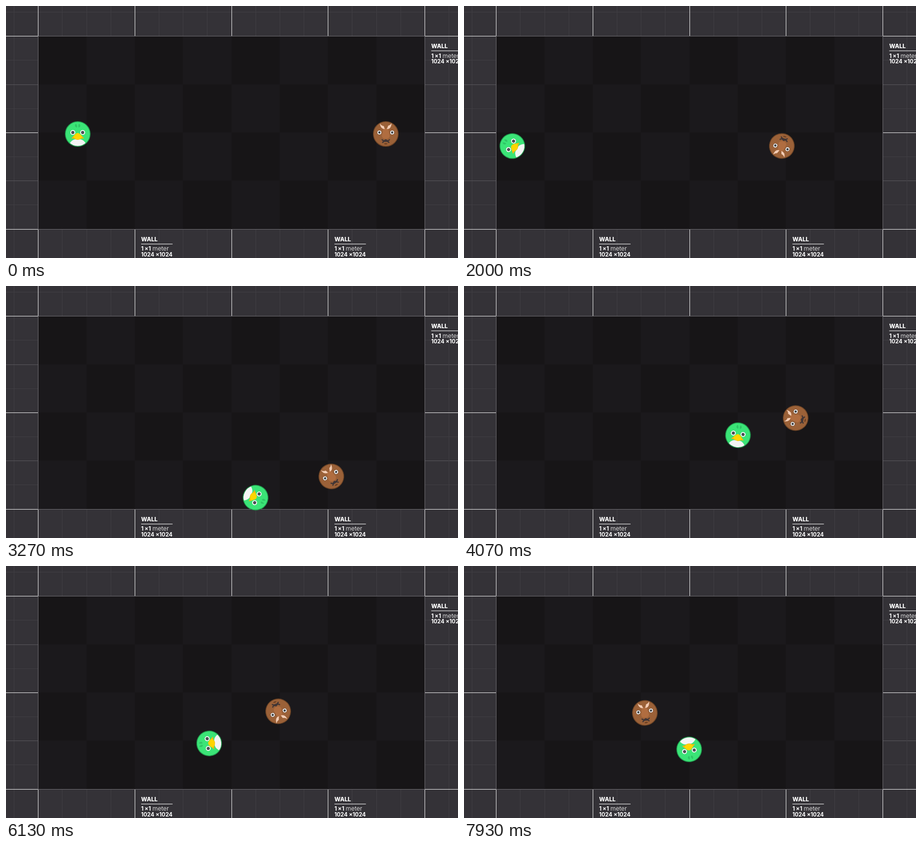
Write an HTML page with a canvas that moves like this. It is 920x514 px and loops after 8 s.

```html
<!DOCTYPE html>
<html lang="en">
<head>
<meta charset="utf-8">
<title>Bouncing heads</title>
<style>
  html, body { margin: 0; width: 100%; height: 100%; overflow: hidden; background: #343237; }
  canvas { display: block; width: 920px; height: 514px; }
</style>
</head>
<body>
<canvas id="stage" width="920" height="514"></canvas>
<script>
const ctx = document.getElementById('stage').getContext('2d');
const LOOP = 8, GRAVITY = 341, FLOOR = 432, RADIUS = 25.3;
const ROOM = { left: 65, top: 61, right: 852, bottom: 455, cell: 98.35 };

// Each contact is [seconds, x, y, degrees]; between contacts a ball flies freely.
const duck = {
  fill: '#3be477', edge: '#20944a', face: duckFace,
  thrust: t => t < 6.5 ? 180 : 0,
  contacts: [
    [0.3, 146, 261, 0], [0.96, 430, 335, 0], [1.3, 300, FLOOR, -10], [1.97, 92, 289, -64],
    [3.27, 508, FLOOR, 117], [4.36, 604, 312, 459], [4.8, 397, FLOOR, 413],
    [6.44, 463, FLOOR, 229], [6.56, 465, 403, 225], [6.66, 467, FLOOR, 221],
    [7.5, 459, FLOOR, 188], [8.72, 457, FLOOR, 140]
  ]
};
const buffalo = {
  fill: '#9b6138', edge: '#6b4325', face: buffaloFace,
  thrust: t => t < 6.5 ? -150 : 94,
  contacts: [
    [0.3, 773, 261, 0], [0.96, 482, 335, 0], [1.24, 537, FLOOR, 102], [3.13, 650, FLOOR, 338],
    [4.36, 656, 280, 267], [5.05, 671, FLOOR, 222], [6.56, 459, 353, 135], [8.41, 378, FLOOR, -58]
  ]
};

// Constant-acceleration curve through both end points
const thrown = (from, to, accel, t, span) =>
  from + ((to - from) / span - accel * span / 2) * t + accel * t * t / 2;

function pose({ contacts, thrust }, time) {
  const i = contacts.findIndex(c => c[0] > time);
  const [t0, x0, y0, a0] = contacts[i - 1], [t1, x1, y1, a1] = contacts[i];
  const t = time - t0, span = t1 - t0;
  return {
    x: thrown(x0, x1, thrust(t0), t, span),
    y: thrown(y0, y1, GRAVITY, t, span),
    angle: (a0 + (a1 - a0) * t / span) * Math.PI / 180
  };
}

function text(string, x, y, font) {
  ctx.font = font + ' Inter, "Open Sans", sans-serif';
  ctx.fillText(string, x, y);
}

function label(x, y) {
  ctx.fillStyle = '#fff';
  text('WALL', x, y, '800 11.7px');
  ctx.fillRect(x, Math.round(y + 5), 64, 1);
  text('1', x, y + 19.5, '700 11.5px');
  text('×', x + 7, y + 19.5, '700 11.5px');
  text('1', x + 15, y + 19.5, '700 11.5px');
  text('meter', x + 23, y + 19.5, '300 12.5px');
  text('1024 ×1024', x, y + 31, '700 11.2px');
}

function room() {
  const { left, top, right, bottom, cell } = ROOM;
  ctx.fillStyle = '#343237';
  ctx.fillRect(0, 0, 920, 514);

  // Every fourth line is strong; strong lines go last, on top
  const strong = n => n % 4 === 0;
  const at = (start, n) => Math.round(start + 0.2 + n * cell / 2);
  for (const pass of [false, true]) {
    for (let n = -1; n <= 17; n++) {
      if (strong(n) !== pass) continue;
      ctx.fillStyle = pass ? '#f0f0f0' : '#403e43';
      const inside = n >= 0 && n <= 16;
      ctx.fillRect(at(left, n), 0, 1, inside ? top : 514);
      if (inside) ctx.fillRect(at(left, n), bottom, 1, 514 - bottom);
      if (n > 8) continue;
      if (!pass && n % 2 === 0) ctx.fillStyle = '#59575c';
      const y = at(top, n);
      ctx.fillRect(0, y, n < 0 ? 920 : left, 1);
      ctx.fillRect(right, y, 920 - right, 1);
    }
  }

  for (let row = 0; row < 4; row++) {
    for (let col = 0; col < 8; col++) {
      ctx.fillStyle = (row + col) % 2 ? '#1b191c' : '#171517';
      ctx.fillRect(at(left, col * 2), at(top, row * 2), 99, 99);
    }
  }
  ctx.strokeStyle = '#706e73';
  ctx.lineWidth = 1;
  ctx.strokeRect(left + 0.5, top + 0.5, right - left, bottom - top);
  label(275, 479.5);
  label(668.5, 479.5);
  label(865.5, 86);
}

function shape(path, fill) {
  ctx.fillStyle = fill;
  ctx.fill(new Path2D(path));
}

function curve(path, color, width) {
  ctx.strokeStyle = color;
  ctx.lineWidth = width;
  ctx.stroke(new Path2D(path));
}

function disc(x, y, r, fill) {
  ctx.fillStyle = fill;
  ctx.beginPath();
  ctx.arc(x, y, r, 0, 7);
  ctx.fill();
}

function duckFace() {
  shape('M-2-13Q-8-15-4-21Q0-17-2-13M2-13Q0-18 3-21Q8-15 2-13', '#2fc566');
  shape('M-17 20Q-12 12-6 11L6 11Q12 12 17 20Q11 26 0 26Q-11 26-17 20', '#f4f4f4');
  for (const x of [-10, 10]) {
    disc(x, -3, 5, '#fff');
    disc(x, -3, 3.2, '#4b5054');
  }
  shape('M-13 9Q-8 3-5 1Q0-3 5 1Q8 3 13 9Q9 9 6 10Q0 14-6 10Q-9 9-13 9', '#f5b90a');
  shape('M-9 6Q-5-2 0-2Q5-2 9 6Q6 11 0 11Q-6 11-9 6', '#ffd500');
}

function buffaloFace() {
  shape('M-5-11L5-11L8 5Q6 10 0 10Q-6 10-8 5Z', '#b06d40');
  shape('M-12-22Q-10-17-4-16L-2-10Q-11-10-12-22M12-23Q10-18 5-17L2-10Q11-9 12-23', '#f2ccb4');
  for (const x of [-13, 13]) {
    disc(x, -3, 4.6, '#63402b');
    disc(x, -3, 4, '#fff');
    disc(x, -3, 2.4, '#45484a');
  }
  curve('M-8 11Q-5 16 0 12Q5 16 8 11M-7 18Q-4 14 0 15Q4 14 7 18', '#403535', 2.4);
  shape('M-4 20Q0 17 4 20Q0 23-4 20', '#6c4023');
}

function drawBall(ball, time) {
  const { x, y, angle } = pose(ball, time);
  ctx.save();
  ctx.translate(x, y);
  ctx.rotate(angle);
  disc(0, 0, RADIUS, ball.fill);
  ctx.save();
  ctx.clip();
  ball.face();
  ctx.restore();
  ctx.strokeStyle = ball.edge;
  ctx.lineWidth = 1.5;
  ctx.beginPath();
  ctx.arc(0, 0, RADIUS, 0, 7);
  ctx.stroke();
  ctx.restore();
}

// The world eases from rest into full speed
const worldTime = t => t < 0.53 ? 0.3 + Math.max(0, t - 0.07) ** 2 / 0.92 : t;

function draw() {
  const time = worldTime(performance.now() / 1000 % LOOP);
  room();
  drawBall(duck, time);
  drawBall(buffalo, time);
  requestAnimationFrame(draw);
}
draw();
</script>
</body>
</html>
```
